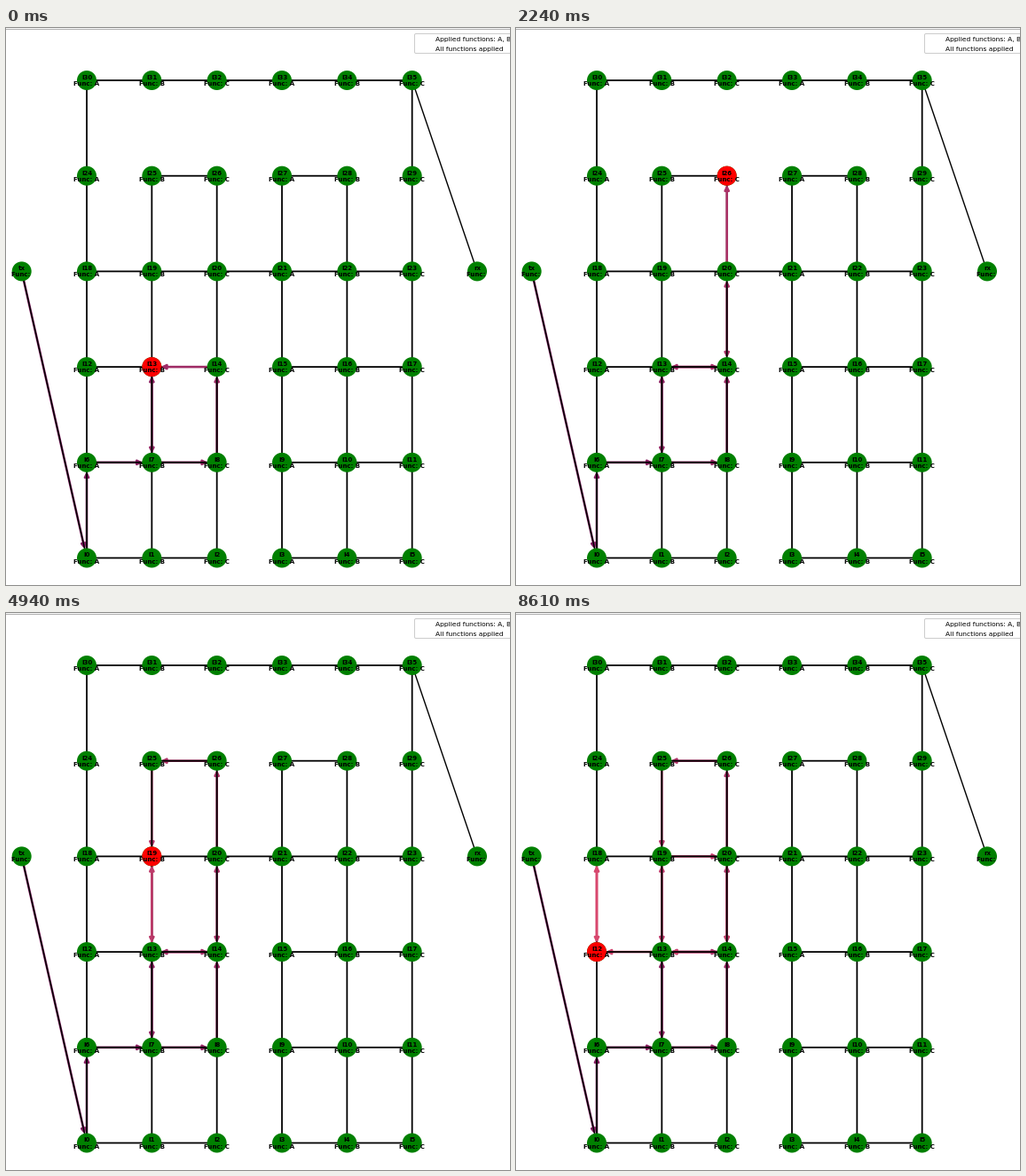
Recreate the animation shown at these times as a matplotlib script. Size 568 by 628 pixels, loop 8.76 s.

```python
import numpy as np
import matplotlib.pyplot as plt
from matplotlib.animation import FuncAnimation
from matplotlib.collections import LineCollection, PatchCollection
from matplotlib.patches import Circle, FancyArrowPatch, FancyBboxPatch

W, H, DPI = 568, 628, 100
PX = 72 / DPI                       # points per pixel
LOOP, FRAMES = 8760, 292
STEP, FIRST = 672, 264              # ms between hops, time of the first hop
DX, DY, R = 220 / 3, 107.7, 11      # grid spacing and node radius

plt.rcParams["font.family"] = "DejaVu Sans"
fig = plt.figure(figsize=(W / DPI, H / DPI), dpi=DPI, facecolor="white")
ax = fig.add_axes([0, 0, 1, 1])
ax.set(xlim=(0, W), ylim=(H, 0))
ax.axis("off")


def place(col, row):
    return 91 + DX * col, 59 + DY * (5 - row)


# 6 x 6 grid numbered from the bottom left, plus both end points
pos = {i: place(i % 6, i // 6) for i in range(36)}
pos["tx"], pos["rx"] = place(-1, 3), place(6, 3)


def name(n):
    if isinstance(n, str):
        return f"{n}\nFunc: "
    return f"I{n}\nFunc: {'ABC'[n % 3]}"


def has_right(n):
    row, col = divmod(n, 6)
    if col == 5:
        return False
    if row == 4:
        return col in (1, 3)
    return col != 2 or row in (3, 5)


def has_up(n):
    row, col = divmod(n, 6)
    return row < 4 or (row == 4 and col in (0, 5))


def add_links(pairs, width):
    ax.add_collection(LineCollection([(pos[a], pos[b]) for a, b in pairs],
                                     colors="black", linewidths=width * PX,
                                     snap=False, zorder=2))


add_links([(n, n + 1) for n in range(36) if has_right(n)]
          + [(n, n + 6) for n in range(36) if has_up(n)], 1.8)
add_links([("tx", 0), (35, "rx")], 1.4)

# Walk of the packet; the first START hops are done when the loop begins
walk = ["tx", 0, 6, 7, 13, 7, 8, 14, 13,
        14, 20, 26, 25, 19, 13, 19, 20, 14, 13, 12, 18, 12]
START = 8
TWO_WAY = {(14, 20)}
OLD, NEW = np.array([128, 28, 96]) / 255, np.array([216, 72, 110]) / 255

hops = []
for k, (a, b) in enumerate(zip(walk, walk[1:])):
    u = k / (len(walk) - 2)
    arrow = FancyArrowPatch(
        pos[a], pos[b], arrowstyle="<|-|>" if (a, b) in TWO_WAY else "-|>",
        mutation_scale=7.5, shrinkA=(R - 1) * PX, shrinkB=(R - 1) * PX,
        color=OLD + (NEW - OLD) * u, linewidth=2.6 * PX, snap=False)
    hops.append(ax.add_patch(arrow))

ax.add_collection(PatchCollection([Circle(p, R) for p in pos.values()],
                                  facecolor="green", linewidth=0, zorder=4))
here = ax.add_patch(Circle((0, 0), R, facecolor="red", linewidth=0, zorder=5))

for n, (x, y) in pos.items():
    ax.text(x, y + 0.5, name(n), size=7 * PX, weight="bold",
            ha="center", va="center", zorder=6)

# Top border and clipped legend
ax.plot([0, W], [1, 1], color="#b4b4b4", lw=1.2 * PX)
ax.add_patch(FancyBboxPatch((462, 8), 140, 19, boxstyle="round,pad=1.5",
                            fc="white", ec="#cccccc", lw=PX, zorder=7))
for y, label in ((13, "Applied functions: A, B, C"), (23.3, "All functions applied")):
    ax.text(484, y, label, size=7.5 * PX, va="center_baseline", zorder=8)


def update(frame):
    t = frame * LOOP / FRAMES
    done = START + int((t - FIRST) // STEP) + 1
    for k, arrow in enumerate(hops):
        arrow.set_visible(k < done)
        arrow.set_zorder(3 if k == done - 1 else 1)
    here.center = pos[walk[done]]
    return [*hops, here]


anim = FuncAnimation(fig, update, frames=FRAMES, interval=LOOP / FRAMES,
                     repeat=True, repeat_delay=0, blit=False)
plt.show()
```
